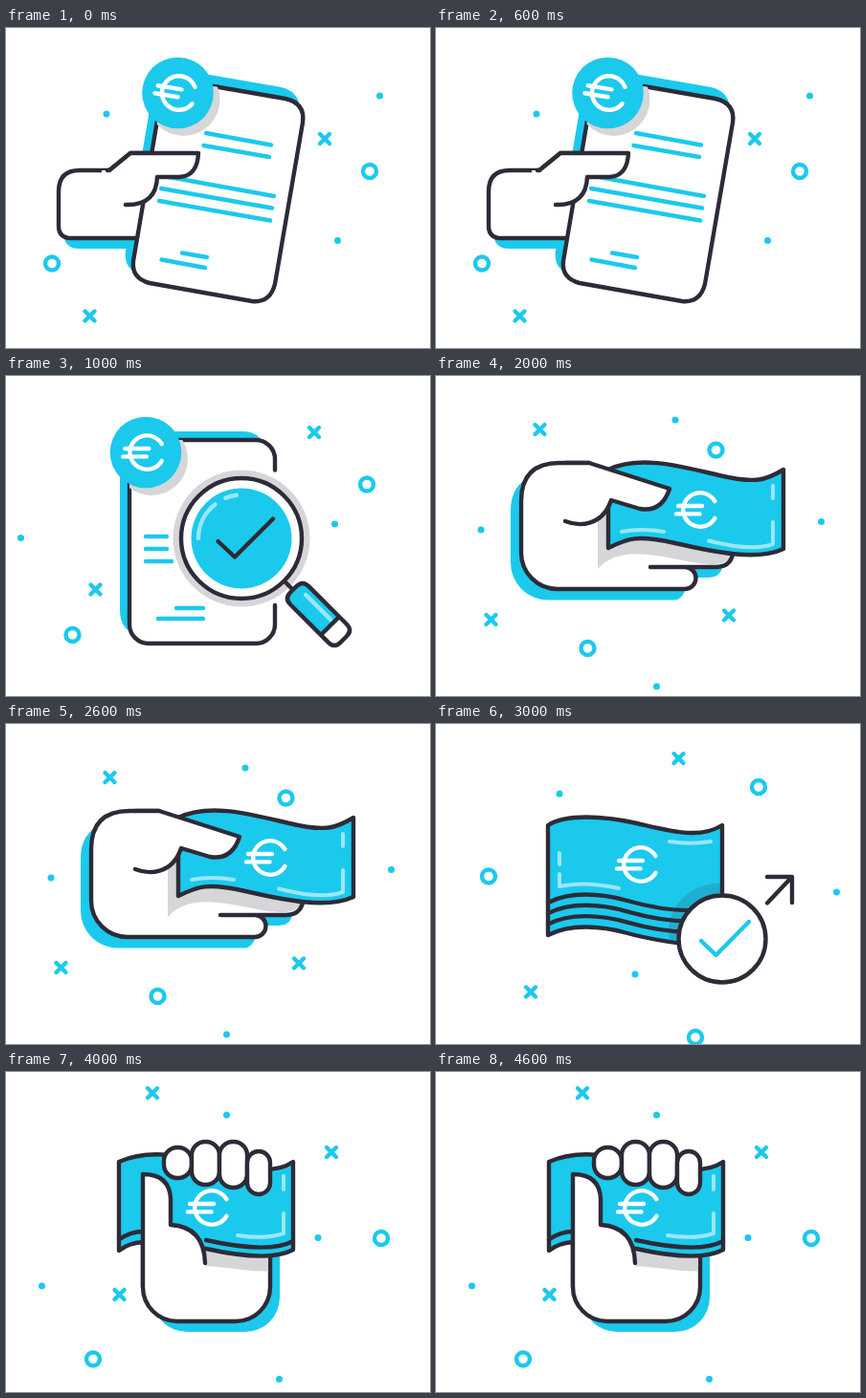
Animation of 443 by 335 pixels, one loop 5000 ms. Source, as an HTML page with a canvas:

```html
<!DOCTYPE html>
<html lang="en">
<head>
<meta charset="utf-8">
<title>Euro payment icons</title>
<style>
html, body { margin: 0; width: 100%; height: 100%; overflow: hidden; background: #fff; }
canvas { display: block; width: 443px; height: 335px; }
</style>
</head>
<body>
<canvas id="stage" width="443" height="335"></canvas>
<script>
const ctx = document.getElementById('stage').getContext('2d');
const CYAN = '#1bc9ed', INK = '#2d2b37', GRAY = '#d6d5d8', PALE = '#9be7f8', WHITE = '#fff';
const HOLD = 1000;

function fill(d, color) {
  ctx.fillStyle = color;
  ctx.fill(new Path2D(d));
}

function line(d, color = INK, width = 4.4) {
  ctx.strokeStyle = color;
  ctx.lineWidth = width;
  ctx.stroke(new Path2D(d));
}

function shape(d, color, edge = INK) {
  fill(d, color);
  line(d, edge);
}

function disc(x, y, r, color) {
  ctx.fillStyle = color;
  ctx.beginPath();
  ctx.arc(x, y, r, 0, Math.PI * 2);
  ctx.fill();
}

function arc(x, y, r, from, to, color, width = 4.4) {
  ctx.strokeStyle = color;
  ctx.lineWidth = width;
  ctx.beginPath();
  ctx.arc(x, y, r, from, to);
  ctx.stroke();
}

function at(x, y, angle, draw) {
  ctx.save();
  ctx.translate(x, y);
  ctx.rotate(angle);
  draw();
  ctx.restore();
}

function clipTo(d, draw) {
  ctx.save();
  ctx.clip(new Path2D(d));
  draw();
  ctx.restore();
}

function euro(x, y, angle = 0) {
  at(x, y, angle, () => {
    arc(0, 0, 17.8, 0.52, Math.PI * 2 - 0.52, WHITE);
    line('M-23 -4H2M-25 4.4H-.5', WHITE);
  });
}

function coin(x, y, paper, angle) {
  clipTo(paper, () => disc(x + 6, y + 7, 38, GRAY));
  disc(x, y, 37.3, CYAN);
  euro(x + 1.3, y, angle);
}

function confetti(dots, crosses, rings) {
  for (const [x, y] of dots) disc(x, y, 3.5, CYAN);
  for (const [x, y] of crosses) at(x, y, 0, () => line('M-5 -5L5 5M-5 5L5 -5', CYAN));
  for (const [x, y] of rings) arc(x, y, 7, 0, Math.PI * 2, CYAN);
}

function handOver() {
  const paper = 'M158 97L217 61L292 74Q313 79 310 99L281 268Q276 288 257 286L150 267Q131 262 133 244Z';
  at(-6, -10, 0, () => shape(paper, CYAN, CYAN));
  fill('M60 215Q61 231 76 231H134V215Z', CYAN);
  shape('M137 220H68Q55 220 55 207V171Q55 149 77 149H108L130 131H152', WHITE);
  fill(paper, WHITE);
  line('M217 61L292 74Q313 79 310 99L281 268Q276 288 257 286L150 267Q131 262 133 244L158 97');
  line('M209 110L277 122.5M206.500 123L275 135M165 155L280 176M162 168L278 188.500' +
       'M160 181L276 201.500M184 235.500L210 240M162.500 242.500L208 251', CYAN);
  fill('M108 149L130 131H201Q200 155 181 156H158Q157 186 125 185H100V149Z', WHITE);
  line('M106 149H108L130 131H201Q200 155 181 156H158Q157 186 125 185');
  coin(179.5, 68, paper, 0.165);
  confetti([[105, 90], [390.5, 71], [346.5, 222.5]],
    [[333, 116], [87.5, 301.5]], [[380, 150], [48, 246.5]]);
}

function inspect() {
  const paper = 'M129 67H261A20 20 0 0 1 281 87V260A20 20 0 0 1 261 280H149A20 20 0 0 1 129 260Z';
  fill('M119 58H247Q266 58 270 75V270H139Q119 268 119 245Z', CYAN);
  fill(paper, WHITE);
  line('M281 98.500V87A20 20 0 0 0 261 67H129V260A20 20 0 0 0 149 280H261A20 20 0 0 0 281 260V240');
  line('M146 168H168M146 181H168M146 194H173M178 243H206M159 254H206', CYAN);
  coin(146, 80, paper, 0);

  const x = 246, y = 170;
  disc(x, y, 71.5, GRAY);
  line('M290 214L302 226');
  disc(x, y, 63, WHITE);
  arc(x, y, 63, 0, Math.PI * 2, INK);
  disc(x, y, 52.5, CYAN);
  arc(x, y, 45, Math.PI, Math.PI * 1.29, PALE);
  arc(x, y, 45.5, Math.PI * 1.38, Math.PI * 1.464, PALE);
  line('M221.500 173L239 189.500L279 149.500');

  at(326.5, 249.5, Math.PI / 4, () => {
    const grip = 'M-28 -13.500H28Q37 -13.500 37 -4.500V4.500Q37 13.500 28 13.500' +
      'H-28Q-37 13.500 -37 4.500V-4.500Q-37 -13.500 -28 -13.500Z';
    fill(grip, WHITE);
    clipTo(grip, () => fill('M-40 -14H17V14H-40Z', CYAN));
    line('M-24 -5H13', PALE);
    line('M17 -13V13');
    line(grip);
  });
  confetti([[15.5, 169.5], [343.5, 155]],
    [[322, 59], [93.5, 223.5]], [[377, 113.5], [69.5, 271]]);
}

function pay() {
  const palm = 'M160 91H129Q89 91 89 131V185A38 38 0 0 0 127 223H260A11.5 11.5 0 0 0 260 200H292Q308 200 310 187L240 150L244 118Z';
  fill('M100 105Q78 114 78 141V195A39 39 0 0 0 117 234.500H249Q258 234 261 222V200H299Q297 211 284 211H262V180H100Z', CYAN);
  fill(palm, WHITE);
  clipTo(palm, () => fill('M169 135V202C188 180 220 185 258 193S298 196 310 190V160H180V135Z', GRAY));
  line('M160 91H129Q89 91 89 131V185A38 38 0 0 0 127 223H260A11.5 11.5 0 0 0 260 200H224M260 200H292Q307 200 310 187');
  shape('M180 98C213 82 258 95 296 104S345 109 363 98V181C335 194 290 184 250 175S200 170 180 180Z', CYAN);
  line('M352 115V128M352 153V176C335 182 310 179 285 172.500M194 163Q215 159 238 163', PALE, 4);
  euro(276, 140);
  fill('M160 91L244 118Q236 143 213 139L183 130C174 157 150 158 135 152V91Z', WHITE);
  line('M135 152C150 158 174 157 183 130L213 139Q236 143 244 118L160 91H135');
  confetti([[250, 46], [47, 161], [402.5, 152.5], [230.5, 325]],
    [[108.5, 56], [57.5, 255], [306, 250.5]], [[292.5, 77.5], [158.5, 285]]);
}

function approve() {
  const stack = 'M117 106C135 94 175 96 210 104S275 121 299 106V235C270 232 228 227 200 219S140 209 117 221Z';
  fill(stack, CYAN);
  clipTo(stack, () => disc(294, 218, 51, '#20aece'));
  line(stack);
  for (let i = 0; i < 3; i++) {
    at(0, i * 11.3, 0, () => line('M117 187C140 175 172 177 200 185S250 196 272 195'));
  }
  line('M244 123Q266 126.500 287 123M129 135V147M129 157V170Q155 164 191 172', PALE, 4);
  euro(214, 147);
  disc(299, 225, 46, WHITE);
  arc(299, 225, 45.5, 0, Math.PI * 2, INK);
  line('M277 227L292.500 242L327 207', CYAN);
  line('M346 187.500L372 160M346 160H372V187');
  confetti([[129, 73], [418.5, 176], [208, 262]],
    [[253.5, 36], [99, 280.5]], [[337, 66], [55, 159.5], [271, 328]]);
}

function finger(x, top, w, bottom, r) {
  ctx.beginPath();
  ctx.roundRect(x, top, w, bottom - top, r);
  ctx.fillStyle = WHITE;
  ctx.fill();
  ctx.strokeStyle = INK;
  ctx.lineWidth = 4.4;
  ctx.stroke();
}

function grab() {
  const palm = 'M143 160V225A36 36 0 0 0 179 261H240A36 36 0 0 0 276 225V160Z';
  at(10, 11, 0, () => fill(palm, CYAN));
  shape(palm, WHITE);
  fill('M205 180H274V208.500C250 209 232 204 205 203Z', GRAY);
  shape('M118 94C150 80 182 88 215 95S280 108 300 94V186C280 197 245 193 209 185L143 178Q128 179 118 187Z', CYAN);
  line('M118 175.500Q130 167 143 167M209 176C245 184 280 188 300 177');
  line('M290 109V123M290 148V169Q270 175.500 242 171', PALE, 4);
  euro(215, 142);
  fill('M143 107Q171 107 172 133V160Q207 162 208 200V225H143Z', WHITE);
  line('M143 225V107Q171 107 172 133V160Q207 162 208 200');
  finger(165, 79, 29, 111, 14);
  finger(194, 73, 29, 118, 14);
  finger(223, 73, 29, 121, 14);
  finger(252, 83, 24, 128, 12);
  confetti([[230.5, 45], [326, 173.5], [37.5, 224], [285.5, 321.5]],
    [[153, 22], [340, 84], [118.5, 233]], [[392, 174], [91, 300.5]]);
}

const scenes = [handOver, inspect, pay, approve, grab];
const start = performance.now();
let shown = -1;

function tick(now) {
  const i = Math.floor(Math.max(0, now - start) / HOLD) % scenes.length;
  if (i !== shown) {
    shown = i;
    ctx.fillStyle = WHITE;
    ctx.fillRect(0, 0, 443, 335);
    ctx.lineCap = ctx.lineJoin = 'round';
    scenes[i]();
  }
  requestAnimationFrame(tick);
}
tick(start);
</script>
</body>
</html>
```
